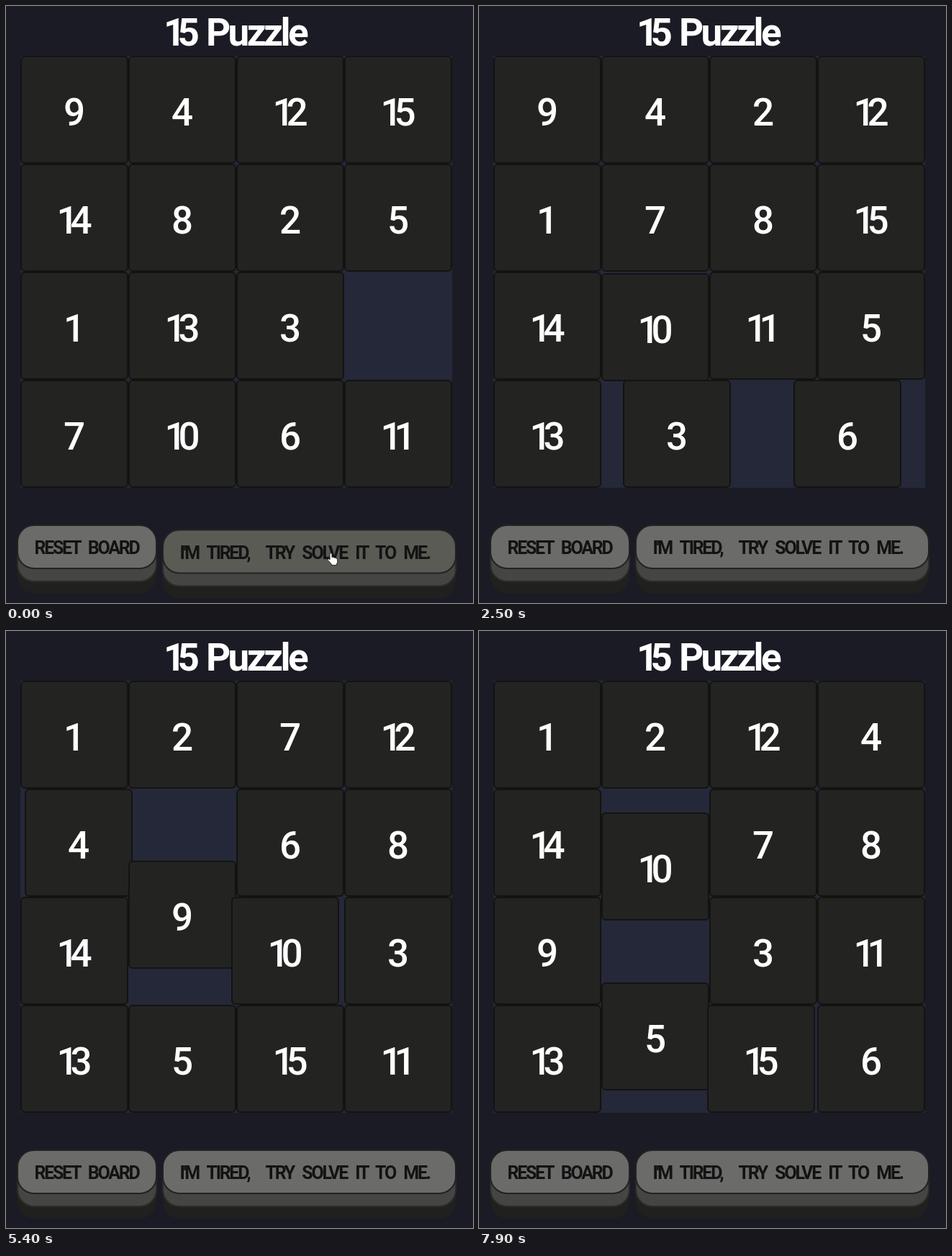
Recreate the animation shown at these times as an HTML page. Size 649 by 829 pixels, loop 8000 ms.

```html
<!DOCTYPE html>
<html lang="en">
<head>
<meta charset="utf-8">
<title>15 Puzzle</title>
<style>
  html, body { margin: 0; width: 100%; height: 100%; overflow: hidden; background: #1b1b25; }
  svg { display: block; font-family: Roboto, Inter, sans-serif; }
  .title { font-size: 53px; font-weight: 700; fill: #fff; letter-spacing: -3.6px; }
  .title .count { letter-spacing: -11px; }
  .tile rect { fill: #232321; stroke: #131312; stroke-width: 2; }
  .tile text { font-size: 53px; font-weight: 500; fill: #fff; letter-spacing: -11px; text-anchor: middle; }
  .label { font-size: 25px; font-weight: 700; fill: #131313; letter-spacing: -2.3px; word-spacing: 7.5px; }
</style>
</head>
<body>
<svg id="stage" width="649" height="829" viewBox="0 0 649 829">
  <text class="title" y="55"><tspan class="count" x="219">15</tspan> <tspan x="278">Puzzle</tspan></text>
  <rect x="20" y="69" width="600" height="600" fill="#252838"/>
  <g id="board"></g>
  <g id="buttons"></g>
  <path id="cursor" d="M450 760.5q1.500-1.500 3 0v5q2-1 3 .6q2-.6 2.700 1q2-.2 2 1.700v3q0 2-1.500 3v1.700h-7v-1.700l-5-5.300q-.4-2 1.600-1.800l1.200 1.200z"
        fill="#fff" stroke="#222" stroke-width="1"/>
</svg>
<script>
const NS = "http://www.w3.org/2000/svg";
const LOOP = 8000, STEP = 100, SLIDE = 300, CELL = 150;
const START = [9, 4, 12, 15, 14, 8, 2, 5, 1, 13, 3, 0, 7, 10, 6, 11];

// Directions the gap travels, and when the last move of each run begins.
const RUNS = [
  ["DLLULDRRURUUL", 1450],
  ["DLDLURDDRR", 2450],
  ["UULLDDRRULLD", 3700],
  ["RRULLUULD", 4583],
  ["RURDDLULDRRULDR", 6083],
  ["RULURDDLLDRURDLLUU", 7850]
];
const DIRS = { U: [0, -1], D: [0, 1], L: [-1, 0], R: [1, 0] };

function add(parent, name, attrs, text) {
  const el = document.createElementNS(NS, name);
  for (const key in attrs) el.setAttribute(key, attrs[key]);
  if (text) el.textContent = text;
  return parent.appendChild(el);
}

// cubic-bezier(.25, .1, .25, 1)
function ease(x) {
  if (x <= 0) return 0;
  if (x >= 1) return 1;
  let lo = 0, hi = 1, u = 0.5;
  for (let i = 0; i < 24; i++) {
    u = (lo + hi) / 2;
    const bx = 0.75 * u * (1 - u) + u ** 3;
    if (bx < x) lo = u; else hi = u;
  }
  return 0.3 * u * (1 - u) ** 2 + 3 * u * u * (1 - u) + u ** 3;
}

const board = document.getElementById("board");
const tiles = [];
for (let n = 1; n <= 15; n++) {
  const at = START.indexOf(n);
  const el = add(board, "g", { class: "tile" });
  add(el, "rect", { x: 1, y: 1, width: 148, height: 148, rx: 5 });
  add(el, "text", { x: 69.5, y: 97 }, String(n));
  tiles[n] = { el, col: at % 4, row: at >> 2, moves: [] };
}

function planMoves() {
  const grid = START.slice();
  let gap = grid.indexOf(0), from = 150;
  for (const [path, end] of RUNS) {
    [...path].forEach((dir, i) => {
      const [dx, dy] = DIRS[dir];
      const next = gap + dx + 4 * dy;
      const time = from + (end - from) * (i + 1) / path.length;
      tiles[grid[next]].moves.push({ time, dx: -dx, dy: -dy });
      grid[gap] = grid[next];
      grid[next] = 0;
      gap = next;
    });
    from = end;
  }
}
planMoves();

function makeButton(x, width, textX, label) {
  const g = add(document.getElementById("buttons"), "g", {});
  const layer = (y, inset, fill, stroke) => add(g, "rect", {
    x: x + inset, y, width: width - 2 * inset, height: 60, rx: 23,
    fill, stroke, "stroke-width": 2
  });
  layer(755, 1, "#20201e", "#20201e");
  layer(739, 0, "#454543", "#2c2c2b");
  const face = layer(721, 0, "#6b6b6a", "#222221");
  add(g, "text", { class: "label", x: textX, y: 761 }, label);
  return { g, face };
}
makeButton(16, 193, 39.5, "RESET BOARD");
const solve = makeButton(218, 407, 241.5, "I'M TIRED,\u00a0 TRY SOLVE IT TO ME.");
const cursor = document.getElementById("cursor");

function draw(t) {
  for (const { el, col, row, moves } of tiles.slice(1)) {
    let x = col, y = row;
    for (const m of moves) {
      const p = ease((t - m.time) / SLIDE);
      x += m.dx * p;
      y += m.dy * p;
    }
    const left = Math.round(20 + x * CELL), top = Math.round(69 + y * CELL);
    el.setAttribute("transform", `translate(${left} ${top})`);
  }
  const press = 1 - ease(t / 250);
  const mix = (up, down) => Math.round(up + (down - up) * press);
  solve.g.setAttribute("transform", `translate(0 ${6.5 * press})`);
  solve.face.setAttribute("fill", `rgb(${mix(107, 91)},${mix(107, 91)},${mix(106, 86)})`);
  cursor.style.display = t < STEP ? "" : "none";
}

const begin = performance.now();
function tick() {
  const t = (performance.now() - begin) % LOOP;
  draw(Math.floor(t / STEP) * STEP);
  requestAnimationFrame(tick);
}
tick();
</script>
</body>
</html>
```
